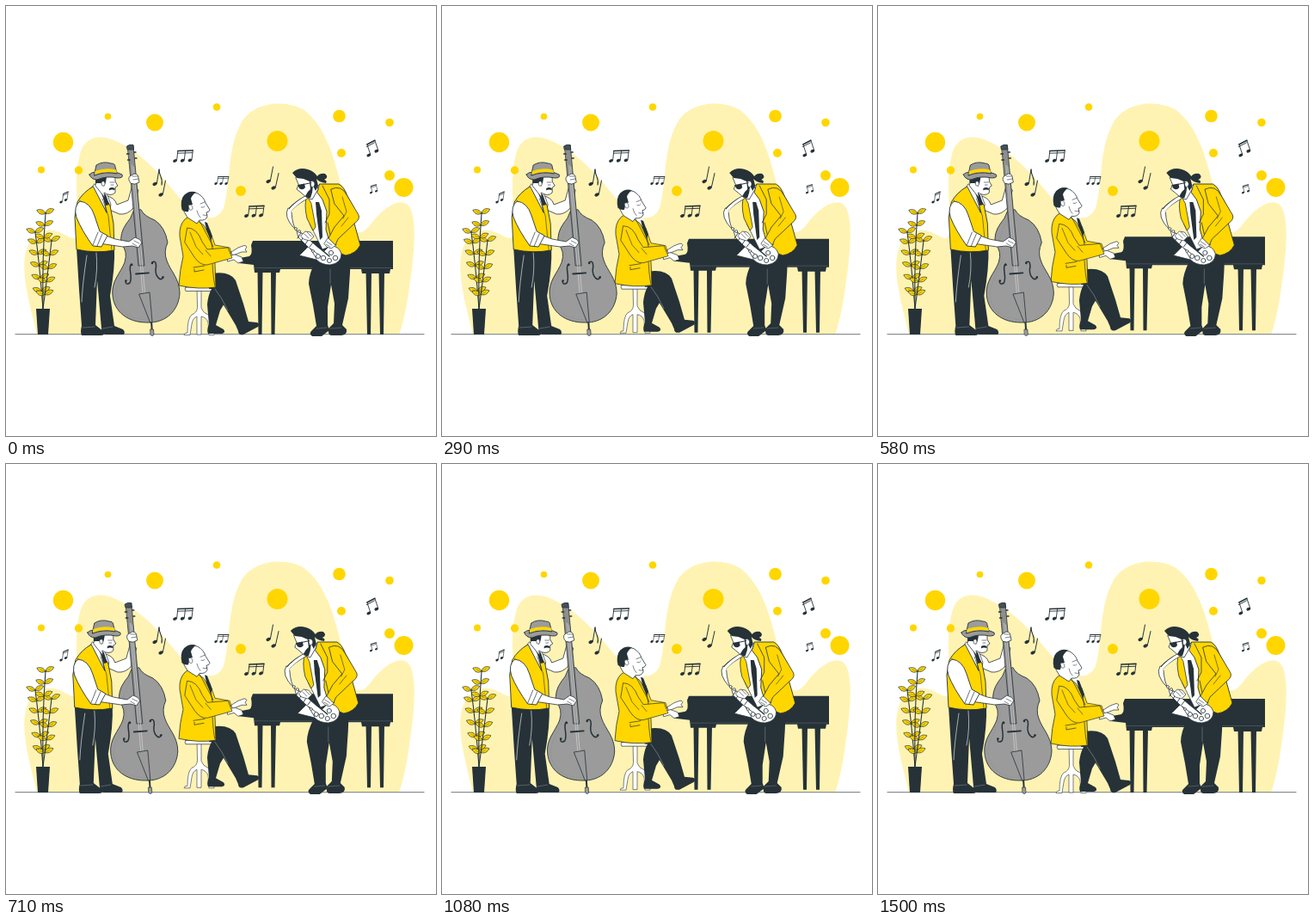
An HTML page with a canvas that plays this animation: 500x500 px, repeating every 1540 ms.

```html
<!DOCTYPE html>
<html lang="en">
<head>
<meta charset="utf-8">
<title>Jazz trio</title>
<style>
html, body { margin: 0; width: 100%; height: 100%; overflow: hidden; background: #fff; }
canvas { display: block; width: 500px; height: 500px; }
</style>
</head>
<body>
<canvas id="stage"></canvas>
<script>
const canvas = document.getElementById('stage');
const ctx = canvas.getContext('2d');
const ratio = window.devicePixelRatio || 1;
canvas.width = canvas.height = 500 * ratio;

const INK = '#263238', YELLOW = '#ffd600', PALE = '#fff3b3', GREY = '#9b9b9b', WHITE = '#fff';
const LOOP = 1540, MOVE = 1500;
const SHAKE = [0, -0.6, 1.2, -2.4, 2.4, -2.4, 2.4, -2.4, 1.2, -0.6, 0];
const LIFT = 6;

const cache = {};
const path = d => cache[d] || (cache[d] = new Path2D(d));

function fill(d, color) {
  ctx.fillStyle = color;
  ctx.fill(path(d));
}
function line(d, width = 0.8, color = INK) {
  ctx.strokeStyle = color;
  ctx.lineWidth = width;
  ctx.stroke(path(d));
}
function shape(d, color, width = 0.8) {
  fill(d, color);
  line(d, width);
}
function oval(x, y, rx, ry, color, angle = 0, outline = 0) {
  ctx.beginPath();
  ctx.ellipse(x, y, rx, ry, angle, 0, 7);
  ctx.fillStyle = color;
  ctx.fill();
  if (outline) {
    ctx.strokeStyle = INK;
    ctx.lineWidth = outline;
    ctx.stroke();
  }
}
const dot = (x, y, r, color = YELLOW) => oval(x, y, r, r, color);

// CSS "ease" curve, solved by bisection
function ease(x) {
  let lo = 0, hi = 1, s = 0.5;
  for (let i = 0; i < 24; i++) {
    s = (lo + hi) / 2;
    const bx = 0.75 * s * (1 - s) + s ** 3;
    if (bx < x) lo = s; else hi = s;
  }
  return 0.3 * s * (1 - s) ** 2 + 3 * s * s * (1 - s) + s ** 3;
}
function shakeAt(p) {
  const u = p * 10, i = Math.min(9, Math.floor(u));
  return SHAKE[i] + (SHAKE[i + 1] - SHAKE[i]) * ease(u - i);
}
const liftAt = p => -LIFT * (1 - Math.abs(2 * p - 1));

function note(x, y, tipX, tipY, size = 1) {
  oval(x, y, 2.7 * size, 1.9 * size, INK, -0.4);
  line(`M${x + 2.3 * size} ${y - 0.5}L${tipX} ${tipY}`, size);
}
function beamed(x, y, step, count, height, size, slope = 0, lean = 1.3) {
  const tip = i => [x + step * i + 2.3 * size + lean, y + slope * i - height];
  for (let i = 0; i < count; i++) note(x + step * i, y + slope * i, ...tip(i), size);
  const a = tip(0), b = tip(count - 1);
  line(`M${a}L${b}`, 1.7 * size);
  line(`M${a[0] - 0.5} ${a[1] + 3 * size}L${b[0] - 0.5} ${b[1] + 3 * size}`, size);
}

function backdrop() {
  fill('M36 382C31 360 18 318 22 291C26 267 43 255 62 263C75 268 84 279 84 255C83 225 79 198 86 172C91 153 107 147 130 158C162 174 182 199 201 222C219 244 242 257 253 235C261 208 257 165 273 137C285 112 325 107 348 122C380 148 386 200 399 245C404 267 413 268 424 254C437 236 458 221 468 232C481 248 472 307 469 327C466 349 462 368 457 382Z', PALE);
  [[118.5, 128.5, 3.8], [173, 135.5, 10], [245, 117.5, 4.3], [66.5, 158.5, 11.7],
   [41, 190.5, 4], [84.5, 191, 4.7], [315.5, 157, 12], [273, 215, 6], [387.5, 128, 7.3],
   [446, 135.5, 4.8], [390, 171, 5], [446, 197, 6], [462.5, 211, 11]].forEach(d => dot(...d));

  beamed(64, 228, 5.5, 2, 9.5, 0.65, -2.5, 1.2);
  note(173, 207, 178, 190);
  line('M178 190C178 198 183 200 181 208', 1.1);
  note(180, 219.5, 185.5, 203);
  beamed(196.5, 180, 8.7, 3, 11.5, 0.9, -0.3);
  beamed(244, 206.5, 6, 3, 8, 0.65);
  beamed(279.5, 244, 8.5, 3, 11, 0.95, -0.3);
  note(305, 204, 310.5, 187);
  note(311, 211.5, 317, 194.5);
  beamed(421.8, 173.5, 9, 2, 12.5, 0.9, -4.8, -4);
  beamed(424.5, 217, 6, 2, 7.5, 0.6, -1.8, -1.5);
  line('M11 381.7H486', 1.2, '#8b9194');
}

function leaf(x, y, angle, size) {
  ctx.save();
  ctx.translate(x, y);
  ctx.rotate(angle);
  ctx.scale(size, size);
  shape('M0 0C3 -4.2 8 -4.2 12 0C8 3.4 3 3.4 0 0Z', YELLOW, 0.7);
  line('M0 0L7 -0.3', 0.35);
  ctx.restore();
}
function branch(x0, y0, cx, cy, x1, y1, pairs, first) {
  line(`M${x0} ${y0}Q${cx} ${cy} ${x1} ${y1}`, 1.1);
  for (let i = 0; i < pairs; i++) {
    const s = first + (1 - first) * i / (pairs - 1), r = 1 - s;
    const x = r * r * x0 + 2 * r * s * cx + s * s * x1;
    const y = r * r * y0 + 2 * r * s * cy + s * s * y1;
    leaf(x, y, -0.45, 0.9);
    leaf(x, y, Math.PI + 0.35, 0.9);
  }
}
function plant() {
  branch(43, 352, 39, 300, 34, 263, 6, 0.2);
  branch(43, 352, 48, 315, 53, 273, 5, 0.22);
  branch(43, 352, 42, 290, 46, 241, 3, 0.72);
  fill('M35 352H51L49 382H37Z', INK);
}

function piano() {
  fill('M287 273H450V306H447L446 311H414L413 306H319L318 310H289L288 301L271 299Q264 294 272 293L283 291Q287 289 285 278Z', INK);
  fill('M292.5 308H298.5L297.5 382H293.5Z M308 308H314L312.5 382H308.5Z M418.5 309H425L424 382H420Z M433.5 309H440L439 382H435Z', INK);
  line('M288 304.5H448', 0.4, '#75828a');
}

function stool() {
  shape('M222.5 331H227V351Q229 357 235 359Q240 362 239 380Q243 380 242 382.5H236L235 368Q233 362 227 361V382H222V361Q217 363 216 370L214 382.5H207Q207 380 211 380Q211 363 216 359Q222 357 222.5 351Z', WHITE, 0.6);
  shape('M209 327H242Q244 329 242 331.5H209Q207 329 209 327Z', WHITE, 0.7);
}

function pianist() {
  stool();
  // far leg, then near leg
  fill('M238 311L261 334L249 354L244 371L253 376Q256 380 251 381H235Q233 377 236 370L234 347Q235 336 239 329Z', INK);
  fill('M240 311Q260 308 267 319L276 346L282 367L292 368Q296 370 293 373L276 382Q270 383 270 378L267 371L252 346L242 329H236Z', INK);
  line('M243 329Q251 339 258 354', 0.5, '#a8b0b4');
  // far sleeve and hand
  shape('M262 286L270 281L277 278.5Q282 279 278 283L280 286L274 286L264 290Z', WHITE, 0.7);
  // torso
  fill('M215 242L234 249L240 276L238 285L226 263Z', WHITE);
  shape('M237 261L243 278L260 281L262 287L245 292L237 281Z', YELLOW, 0.7);
  shape('M208 248Q201 255 202 268L206 291Q202 307 201 325Q224 330 244 327L243 300L238 270L230 255L215 244Z', YELLOW);
  fill('M231 251L234 252L240 268L238 273L233 260Z', INK);
  line('M225 250L232 263L241 280M240 300Q241 317 243 326', 0.7);
  line('M218 304L231 302M219 306L219 309L230 307', 0.7);
  // near arm
  shape('M257 291L266 289L274 292L276 297L270 299L265 295L258 297Z', WHITE, 0.7);
  shape('M211 258Q222 258 228 274L234 283L258 281L263 293L234 301Q226 302 219 292L208 275Z', YELLOW, 0.7);
  line('M214 263L221 280L229 289M232 284L238 291', 0.6);
  // head
  shape('M206 223Q214 214 223 218Q230 222 232 229L237 237Q236 240 233 240L234 245Q232 250 225 249L222 253L211 246Q202 233 206 223Z', WHITE);
  fill('M221 216.5Q213 214 207 220Q202 226 204.5 237Q208 240 212 239L214 231L217 231L215 224Q216 220 221 216.5Z', INK);
  shape('M214 231Q211 231 213 236Q215 239 217 236Q217 231 214 231Z', WHITE, 0.6);
  line('M226 230L231 228M227 234Q230 235 231 233M229 243Q232 244 234 243M222 238Q223 243 226 246', 0.6);
}

function bass() {
  line('M169 366L170 381', 2);
  shape('M168 376H171.5L172 382Q170 385 168 382Z', GREY, 0.7);
  shape('M148 239Q145 248 140 253Q132 264 134 277Q142 285 138 298C133 311 122 320 124 337C126 356 142 368 164 368C187 369 201 353 202 334C202 317 191 308 187 296Q183 286 188 275Q185 257 173 249Q160 244 157 237Z', GREY, 0.9);
  line('M151 241Q141 261 138 276Q145 287 140 302C133 317 127 325 128 338C130 354 145 365 165 365', 0.3, '#858c8f');
  // neck and strings
  shape('M141.5 163L148 161.5L150 184L161 302L154 302L143.5 186Z', '#8e8e8e', 0.8);
  shape('M140.5 163Q144 160 148 162L148.5 167H141.5Z', '#455056', 0.8);
  line('M140.5 172H143M149 170H151M141.5 179H144M150 177H152', 1.4);
  line('M146.5 185L159 334M148.5 187L161.5 334', 0.6, '#dedede');
  line('M151 311.5L166 310.3', 1.8);
  shape('M155 335L167 333L170 367L168 368Z', GREY, 0.8);
  // sound holes
  line('M146 300C141 303 148 315 144 322Q139 325 139 320', 1.5);
  line('M170 298C175 295 175 302 174 307C174 316 181 321 183 315', 1.5);
  dot(146.2, 301, 1.3, INK);
  dot(139.5, 319.5, 1.3, INK);
  dot(170, 299, 1.3, INK);
  dot(182.3, 315.5, 1.3, INK);
}

function bassist() {
  // trousers and shoes
  fill('M82 281L126 280Q127 305 121 337L126 372L136 376Q139 379 137 382H116Q111 382 111 375L108 341L106 319L104 371L113 378Q116 383 110 383H88Q86 379 88 372L85 330Z', INK);
  line('M105 287Q107 307 103 327M94 290Q89 323 88 344', 0.6, WHITE);
  line('M89 374L103 373M112 375L124 373', 0.5, '#87939a');
  // raised arm
  shape('M117 221Q126 222 129 231L142 226L147 208L154 214L148 235Q141 243 132 242L118 236Z', WHITE, 0.8);
  bass();
  shape('M145 206Q141 201 144 198L149 195Q154 195 154 200L155 205L150 207Z', WHITE, 0.8);
  line('M147 198L153 198M148 202L154 201', 0.6);
  // shirt and vest
  shape('M103 207L117 217L122 231L118 244L101 232L95 219Z', WHITE, 0.7);
  shape('M101 210Q89 217 83 228L80 245L82 283Q104 288 126 284L125 253L121 232L113 219L117 240Z', YELLOW, 0.9);
  line('M112 224L119 244L123 284', 0.6);
  fill('M111 218L116 219L120 231L116 232Z', INK);
  // bowing arm
  shape('M111 265L127 271L143 274L150 269Q157 271 158 275L154 281L147 279L136 280L108 276Z', WHITE, 0.8);
  line('M149 273L155 276M147 276L152 279', 0.6);
  shape('M86 227Q98 228 103 244L109 262L118 267L111 280L101 279Q88 261 82 246Q78 233 86 227Z', WHITE, 0.9);
  line('M107 263L101 278M112 265L106 279', 0.7);
  // head
  shape('M108 198H127L127 204L130 209L127 211L127 217Q122 222 114 217L115 223L104 209Z', WHITE, 0.8);
  fill('M104 199H117L116 205L114 210L111 206L104 206Z', INK);
  shape('M111 205Q114 202 115 206Q115 210 112 209Z', WHITE, 0.6);
  fill('M120 212Q123 210 126.5 212L126.5 214Q122 213 120 214.5Z', INK);
  line('M121 205H126M122 208H125', 0.6);
  // hat
  shape('M97 196Q101 192 105 194Q122 189 135 196Q137 200 130 200Q117 197 106 202Q99 202 97 196Z', GREY, 0.9);
  shape('M103 194L105 185Q113 180 122 183Q127 183 127 187L129 195Q115 192 103 197Z', GREY, 0.9);
  fill('M103.5 192Q115 187.5 128 190.5L129 194Q115 191 103.2 196Z', YELLOW);
}

function sax() {
  line('M350 222Q337 229 330 237', 4.8);
  line('M350 222Q337 229 329 239', 3.2, WHITE);
  shape('M328 235Q325 240 327 246Q332 259 345 265L362 280L370 285L376 279Q387 278 390 288Q390 299 377 301Q367 301 361 295L341 290L351 280L340 269L338 262Q333 255 332 240', WHITE, 0.8);
  line('M341 290L351 280L366 291M361 294L354 282', 0.8);
  line('M343 264L339 270M347 267L343 273M352 271L348 277M357 275L353 280', 0.9);
  [[363, 291, 2.5], [369, 293, 2.8], [376, 296, 2.6], [383, 293, 2.8], [378, 287, 2.6]]
    .forEach(([x, y, r]) => oval(x, y, r, r, WHITE, 0, 0.8));
  [[337, 259], [341, 262], [357, 285]].forEach(([x, y]) => oval(x, y, 1.5, 1.5, WHITE, 0, 0.7));
  line('M364 281L376 291', 1.4);
}

function saxophonist() {
  // trousers and shoes
  fill('M366 282L401 284L400 310L398 340L391 371L396 376Q397 382 390 383H378Q374 382 375 375L381 369L382 346L378 324L374 350L374 371L376 377L367 384H356Q352 381 355 378L361 372L357 348L352 323Q352 312 360 296Z', INK);
  line('M377 306L377 323', 0.5, '#8d989d');
  line('M377 375L390 374M361 375L373 374', 0.5, '#75828a');
  // shirt, tie and jacket
  shape('M350 222L365 207L376 221L381 278L368 283L354 255Z', WHITE, 0.7);
  fill('M360 228L364 228L367 238L368 269L365 272L361 242Z', INK);
  shape('M350 221Q346 230 350 247L357 261L360 257L355 230Z', YELLOW, 0.8);
  shape('M365 207L387 207Q393 210 397 221L410 245L405 253L412 278Q407 288 395 290L379 284L372 260L373 239L368 225L362 217Z', YELLOW, 0.9);
  line('M368 209L376 225L376 242L371 252M374 252L380 279', 0.8);
  sax();
  // far hand
  shape('M343 267L348 262L354 263L358 268L353 273L346 271Z', WHITE, 0.7);
  line('M347 265L352 270M350 263L355 268', 0.6);
  // near arm
  shape('M370 276L374 270L382 270L384 278L378 282L373 280Z', WHITE, 0.7);
  line('M373 274L379 278M372 277L377 280', 0.6);
  shape('M378 213Q390 207 397 221L410 243Q412 248 405 253L386 271L383 278L375 270L382 257L393 244L382 230Z', YELLOW, 0.8);
  line('M391 222L396 239L392 247M398 246L390 256', 0.6);
  // head
  shape('M337 199L342 194L358 198L363 213L356 225L350 223L343 217L338 213L340 208Z', WHITE, 0.8);
  fill('M333 194Q340 187 351 190Q358 192 362 198Q365 194 371 195Q376 199 370 202Q374 203 372 206Q364 205 361 201L363 209L360 215L357 209L356 217L354 223Q351 224 348 221L351 216L354 213L353 204L346 201L338 200Z', INK);
  shape('M354 204Q358 202 359 207Q358 212 355 210Z', WHITE, 0.6);
  fill('M339 208L347 206.5L348 211Q345 215 341 212Z', INK);
  line('M346 207.5L355 205.5', 1);
}

function at(x, y, draw) {
  ctx.save();
  ctx.translate(x, y);
  draw();
  ctx.restore();
}

function render(now) {
  const p = Math.min(1, (now % LOOP) / MOVE);
  const shake = shakeAt(p);
  ctx.setTransform(ratio, 0, 0, ratio, 0, 0);
  ctx.fillStyle = WHITE;
  ctx.fillRect(0, 0, 500, 500);
  ctx.lineJoin = ctx.lineCap = 'round';
  backdrop();
  plant();
  at(0, liftAt(p), () => { piano(); pianist(); });
  at(shake, 0, bassist);
  at(shake, 0, saxophonist);
}

const start = performance.now();
function tick() {
  render(performance.now() - start);
  requestAnimationFrame(tick);
}
tick();
</script>
</body>
</html>
```
